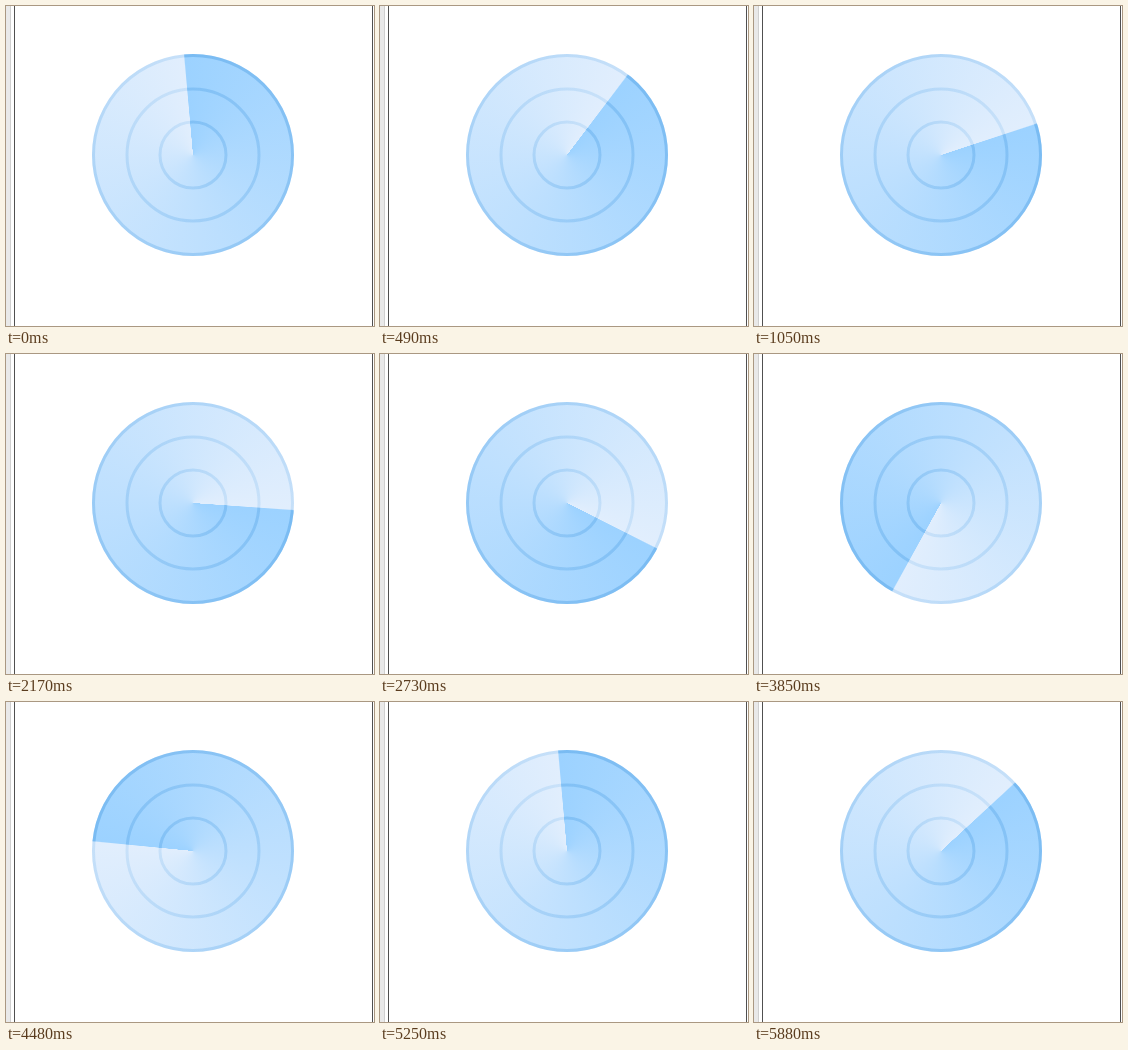
Write an HTML page with a canvas that moves like this. It is 368x320 px and loops after 6230 ms.

```html
<!DOCTYPE html>
<html>
<head>
<meta charset="utf-8">
<title>Radar sweep</title>
<style>
  html, body { margin: 0; width: 100%; height: 100%; overflow: hidden; background: #fff; }
  canvas { display: block; }
</style>
</head>
<body>
<canvas id="stage" width="368" height="320"></canvas>
<script>
const ctx = document.getElementById('stage').getContext('2d');
const CX = 187, CY = 149, RADIUS = 101;
const LOOP = 6230, STEP = 70, LAST = 5880;  // the last pose is held to the loop's end
const TURN = 5250, REST = 1800;             // one eased turn, slowest at REST

function sweepAngle(time) {
  const p = ((time - REST + TURN) % TURN) / TURN;
  return Math.PI * (1 - Math.cos(Math.PI * p));  // 0 points right
}

function bar(color, x, w) {
  ctx.fillStyle = color;
  ctx.fillRect(x, 0, w, 320);
}

function drawBorders() {
  bar('#fff', 0, 368);
  bar('#e9e9e9', 0, 4);
  bar('#d0d0d0', 4, 1);
  bar('#505050', 8, 1);
  bar('#505050', 366, 1);
}

function circle(r) {
  ctx.beginPath();
  ctx.arc(CX, CY, r, 0, 2 * Math.PI);
}

// Fades clockwise from the sweep's edge, with a slightly softened seam.
function sweepGradient(angle, from, to) {
  const gradient = ctx.createConicGradient(angle, CX, CY);
  gradient.addColorStop(0, from);
  gradient.addColorStop(0.998, to);
  gradient.addColorStop(1, from);
  return gradient;
}

function ring(r, style) {
  ctx.strokeStyle = style;
  circle(r);
  ctx.stroke();
}

function drawRadar(angle) {
  circle(RADIUS);
  ctx.fillStyle = sweepGradient(angle, '#9cd2ff', '#e1eefd');
  ctx.fill();

  ctx.lineWidth = 3;
  const inner = sweepGradient(angle, 'rgba(92, 168, 232, 0.42)', 'rgba(92, 168, 232, 0.18)');
  ring(33, inner);
  ring(66, inner);
  ring(RADIUS - 1.5, sweepGradient(angle, 'rgba(92, 168, 232, 0.55)', 'rgba(92, 168, 232, 0.2)'));
}

function frame() {
  const time = performance.now() % LOOP;
  drawBorders();
  drawRadar(sweepAngle(Math.min(LAST, Math.floor(time / STEP) * STEP)));
  requestAnimationFrame(frame);
}
frame();
</script>
</body>
</html>
```
